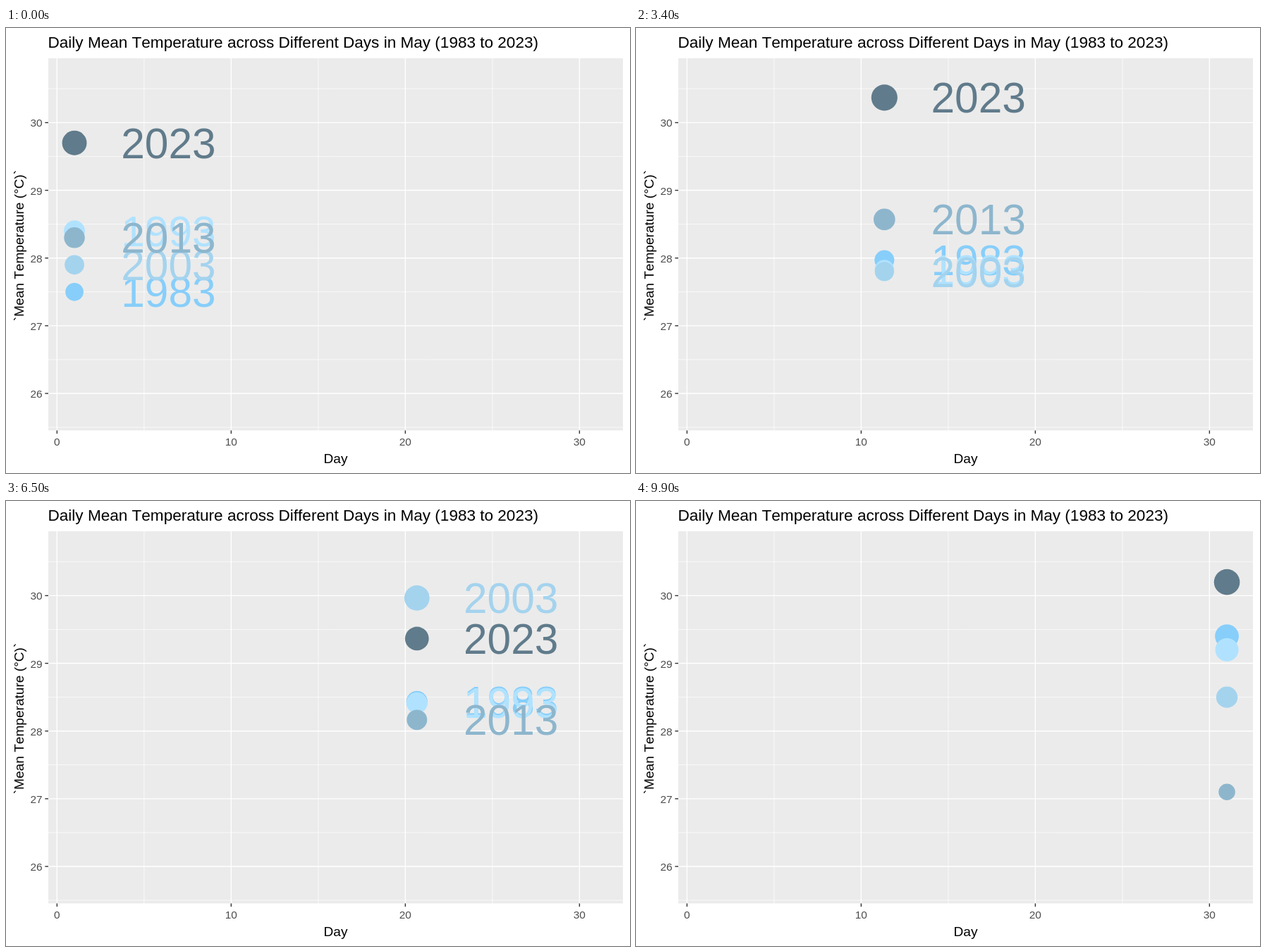
Recreate the animation shown at these times as an HTML page with a canvas. Size 885 px wide and 632 px high, loop 10 s.

```html
<!DOCTYPE html>
<html lang="en">
<head>
<meta charset="utf-8">
<title>Daily mean temperature</title>
<style>
html, body { margin: 0; width: 100%; height: 100%; overflow: hidden; background: #fff; }
canvas { display: block; }
</style>
</head>
<body>
<canvas id="chart" width="885" height="632"></canvas>
<script>
const ctx = document.getElementById('chart').getContext('2d');
const FRAMES = 100, STEP = 100;
const panel = { x: 60, y: 43, w: 815, h: 528.5 };

// Turning points of each year's temperature, on shared days
const keyDays = [1, 5.5, 8, 34 / 3, 13, 43 / 3, 18, 70 / 3, 29, 31];
const series = [
  { year: '1983', color: '#87CEFA', temps: [27.5, 28.05, 28.3, 27.97, 28.2, 28.53, 28.4, 28.47, 28.9, 29.4] },
  { year: '1993', color: '#B0E2FF', temps: [28.4, 27, 26.2, 27.83, 28.3, 28.9, 28.6, 28.23, 29, 29.2] },
  { year: '2003', color: '#A4D3EE', temps: [27.9, 28.95, 28.6, 27.8, 27.4, 28.17, 29.6, 30.33, 29, 28.5] },
  { year: '2013', color: '#8DB6CD', temps: [28.3, 27.75, 28.2, 28.57, 28.7, 28.8, 27.8, 28.53, 25.7, 27.1] },
  { year: '2023', color: '#607B8B', temps: [29.7, 29.1, 29.5, 30.37, 30.7, 29.83, 29.2, 29.53, 30.4, 30.2] }
];

const xOf = day => 72.35 + day * 24.7;
const yOf = temp => 134.4 + (30 - temp) * 96.15;
const radiusOf = temp => 3.5 + 15.6 * Math.sqrt((temp - 25.7) / 5);

// Each whole day sits on a whole frame
const frameOf = day => Math.round((day - 1) * 3.3);

function dayAt(frame) {
  let d = 1;
  while (d < 30 && frameOf(d + 1) <= frame) d++;
  return d + (frame - frameOf(d)) / (frameOf(d + 1) - frameOf(d));
}

function tempAt(temps, day) {
  let i = 0;
  while (i < keyDays.length - 2 && keyDays[i + 1] <= day) i++;
  const part = (day - keyDays[i]) / (keyDays[i + 1] - keyDays[i]);
  return temps[i] + (temps[i + 1] - temps[i]) * part;
}

function text(str, x, y, size, color, align = 'left') {
  ctx.font = `${size}px "Liberation Sans", Arial, sans-serif`;
  ctx.fillStyle = color;
  ctx.textAlign = align;
  ctx.fillText(str, x, y);
}

function line(x1, y1, x2, y2, width, color) {
  ctx.lineWidth = width;
  ctx.strokeStyle = color;
  ctx.beginPath();
  ctx.moveTo(x1, y1);
  ctx.lineTo(x2, y2);
  ctx.stroke();
}

function drawAxes() {
  const { x, y, w, h } = panel, right = x + w, bottom = y + h;
  const column = (day, width) => line(xOf(day), y, xOf(day), bottom, width, '#fff');
  const row = (temp, width) => line(x, yOf(temp), right, yOf(temp), width, '#fff');

  ctx.fillStyle = '#fff';
  ctx.fillRect(0, 0, 885, 632);
  ctx.fillStyle = '#EBEBEB';
  ctx.fillRect(x, y, w, h);

  for (let d = 5; d < 30; d += 10) column(d, 0.7);
  for (let t = 25.5; t < 31; t++) row(t, 0.7);
  for (let d = 0; d <= 30; d += 10) {
    column(d, 1.4);
    line(xOf(d), bottom, xOf(d), bottom + 4.7, 1.4, '#333');
    text(d, xOf(d), 592.5, 15.4, '#4D4D4D', 'center');
  }
  for (let t = 26; t <= 30; t++) {
    row(t, 1.4);
    line(x - 4.7, yOf(t), x, yOf(t), 1.4, '#333');
    text(t, 51.5, yOf(t) + 6, 15.4, '#4D4D4D', 'right');
  }

  text('Daily Mean Temperature across Different Days in May (1983 to 2023)', 59.5, 28, 22.55, '#000');
  text('Day', 467.5, 618, 19.1, '#000', 'center');
  ctx.save();
  ctx.translate(25, 309);
  ctx.rotate(-Math.PI / 2);
  text('`Mean Temperature (°C)`', 0, 0, 19.1, '#000', 'center');
  ctx.restore();
}

function drawData(day) {
  const x = xOf(day);
  const points = series.map(s => ({ ...s, temp: tempAt(s.temps, day) }));
  ctx.save();
  ctx.beginPath();
  ctx.rect(panel.x, panel.y, panel.w, panel.h);
  ctx.clip();
  for (const p of points) {
    ctx.fillStyle = p.color;
    ctx.beginPath();
    ctx.arc(x, yOf(p.temp), radiusOf(p.temp), 0, 2 * Math.PI);
    ctx.fill();
  }
  for (const p of points) text(p.year, x + 66.2, yOf(p.temp) + 21.6, 60.4, p.color);
  ctx.restore();
}

ctx.fontKerning = 'none';
const start = performance.now();

function draw() {
  const frame = Math.floor((performance.now() - start) / STEP) % FRAMES;
  drawAxes();
  drawData(dayAt(frame));
  requestAnimationFrame(draw);
}
draw();
</script>
</body>
</html>
```
